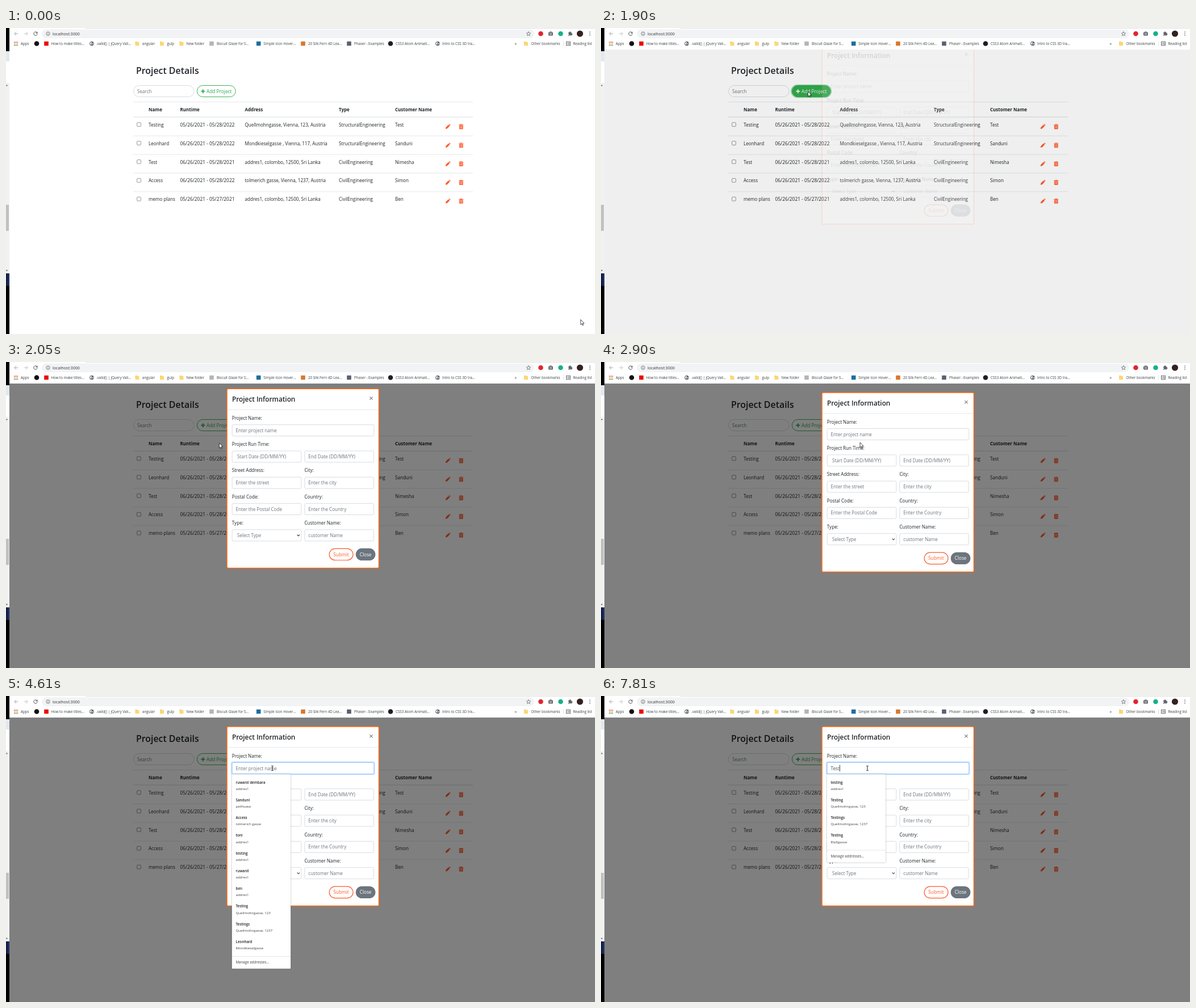
An HTML page for the animation above (8 s loop, 1037 by 540 pixels).

```html
<!DOCTYPE html>
<html lang="en">
<head>
<meta charset="utf-8">
<title>Project Details</title>
<style>
html, body { margin: 0; width: 100%; height: 100%; overflow: hidden; background: #fff; }
svg { display: block; width: 100vw; height: 100vh; font-family: "Open Sans", "Noto Sans", sans-serif; }
text { white-space: pre; }
.menu { filter: drop-shadow(0 .6px 1px rgba(0, 0, 0, .35)); }
</style>
</head>
<body>
<svg id="stage" viewBox="0 0 1037 540"></svg>
<script>
const DURATION = 8000;
const INK = '#212529', MUTED = '#6c757d', LINE = '#dee2e6', ORANGE = '#ff5a2b', GREEN = '#28a745';

// ---- drawing helpers
const text = (x, y, s, size = 8.1, fill = INK, more = '') =>
  `<text x="${x}" y="${y}" font-size="${size}" fill="${fill}" ${more}>${s}</text>`;
const rect = (x, y, w, h, fill, more = '') =>
  `<rect x="${x}" y="${y}" width="${w}" height="${h}" fill="${fill}" ${more}/>`;
const dot = (x, y, r, fill, more = '') => `<circle cx="${x}" cy="${y}" r="${r}" fill="${fill}" ${more}/>`;
const path = (d, fill = 'none', more = '') => `<path d="${d}" fill="${fill}" ${more}/>`;
const at = (x, y, body) => `<g transform="translate(${x} ${y})">${body}</g>`;
const group = (id, body, more = '') => `<g id="${id}" ${more}>${body}</g>`;
const stroke = (color, w = 1) => `stroke="${color}" stroke-width="${w}"`;
const bold = 'font-weight="700"', semi = 'font-weight="600"';

// ---- icons, centred on the origin
const folder = rect(-3.5, -3.6, 3.6, 2, '#f2c14e', 'rx=".5"') + rect(-3.5, -2.7, 7, 6.4, '#fbd775', 'rx=".6"');
const globe = dot(0, 0, 3.8, '#5f6368') +
  path('M-2.8-1.5L-.6-2.6.4-1.2-1 .2-.3 1.8-1.2 2.6-2.6.6ZM1.2-.6L2.9-.9 2.8.9 1.6 2Z', '#fff');
const square = color => rect(-3.8, -3.8, 7.6, 7.6, color, 'rx=".6"');
const disc = color => dot(0, 0, 4.3, color);
const pen = path('M-4.2 4.2L-3.6 1.3 1-3.2 3.2-1-1.3 3.6ZM1.6-3.8L2.4-4.4Q2.9-4.6 3.3-4.2L4.2-3.3Q4.6-2.9 4.4-2.4L3.8-1.6Z', ORANGE);
const trash = rect(-1.3, -4.4, 2.6, 1.2, ORANGE) + rect(-3.9, -3.7, 7.8, 1.2, ORANGE, 'rx=".3"') +
  path('M-3.4-2H3.4V3.4Q3.4 4.4 2.4 4.4H-2.4Q-3.4 4.4-3.4 3.4Z', ORANGE) +
  path('M-1.6-1V3.2M0-1V3.2M1.6-1V3.2', 'none', stroke('#fff', .55));
const star = path('M0-3.6L1.1-1.2 3.6-.9 1.7.8 2.3 3.4 0 2.1-2.3 3.4-1.7.8-3.6-.9-1.1-1.2Z', 'none', stroke('#5f6368', .8));
const camera = rect(-3.9, -2.6, 7.8, 6, '#5f6368', 'rx=".8"') + rect(-1.6, -3.7, 3.2, 1.6, '#5f6368') +
  dot(0, .4, 1.9, '#fff') + dot(0, .4, 1.2, '#5f6368');
const puzzle = rect(-3.4, -2.2, 5.8, 5.8, '#5f6368', 'rx=".7"') + dot(-.5, -2.5, 1.3, '#5f6368') +
  dot(2.7, .7, 1.3, '#5f6368') + dot(-3.2, .8, .9, '#fff') + dot(-.5, 3.4, .9, '#fff');
const arrow = 'M3.4 0H-3.2M0-3.3L-3.3 0 0 3.3';

// ---- browser frame
function leftStrip() {
  return rect(0, 0, 6, 540, '#000') + rect(0, 41, 6, 18, '#e4e8ee') + rect(0, 59, 6, 38, '#fff') +
    rect(0, 97, 6, 336, '#f1f1f1') + rect(0, 312, 5, 46, '#c1c1c1') +
    path('M0 102.2L1.4 100 2.9 102.2ZM0 427L1.4 429.2 2.9 427Z', '#505050') +
    rect(0, 433, 6, 22, '#14204a') + rect(4, 433, 1, 22, '#31456f');
}

function toolbar() {
  const grey = '#5f6368';
  return rect(6, 0, 1031, 38, '#fff') + rect(140, 0, 897, 1, '#dee1e6') +
    rect(63, 2.5, 867, 15.5, '#f1f3f4', 'rx="7.75"') +
    at(18, 10, path(arrow, 'none', stroke('#9a9da1', .9))) +
    at(35, 10, path(arrow, 'none', stroke('#b9bbbe', .9) + ' transform="scale(-1 1)"')) +
    at(52, 10, path('M2.6-1.9A3.2 3.2 0 1 0 3.2.5', 'none', stroke('#4a4d51', 1)) + path('M3.5-3.7V-.6H.4Z', '#4a4d51')) +
    at(74, 10, dot(0, 0, 3.2, 'none', stroke(grey, .8)) + path('M0-.4V1.8M0-1.9V-1.1', 'none', stroke(grey, .9))) +
    text(82, 12.6, 'localhost:3000', 7.1, '#303236') +
    at(920, 10, star) + at(941.5, 10, disc('#e0262d')) + at(959, 10, camera) +
    at(976.5, 10, disc('#15b08a')) + at(993.5, 10, puzzle) + at(1010.5, 10, dot(0, 0, 5.6, '#35211f')) +
    [-3, 0, 3].map(d => dot(1028, 10 + d, .85, grey)).join('');
}

function bookmarks() {
  const items = [
    [54, disc('#111')], [71, square('#f00000'), 79.5, 'How to make titles...'],
    [151, globe, 159, '.valid() | jQuery Vali...'], [231, folder, 240, 'angular'],
    [274.5, folder, 283.5, 'gulp'], [309, folder, 317.5, 'New folder'],
    [362, square('#b5b5b5'), 371, 'Biscuit Glaze for S...'], [444.7, square('#1c6f9c'), 453.3, 'Simple Icon Hover...'],
    [523, square('#d8772e'), 532, '20 Silk Fern 4D Lea...'], [604, square('#5b5f72'), 613, 'Phaser - Examples'],
    [677, disc('#1e1f26'), 686, 'CSS3 Atom Animati...'], [760, globe, 768, 'Intro to CSS 3D tra...'],
    [915.5, folder, 924.5, 'Other bookmarks']
  ];
  const hues = ['#e04a3f', '#e8a33b', '#4c9a52'];
  let out = text(26, 29.8, 'Apps', 6.2, '#3c4043') + text(895.5, 29.8, '»', 7.5, '#3c4043') +
    text(998.5, 29.8, 'Reading list', 6.2, '#3c4043');
  for (let i = 0; i < 9; i++) out += rect(14 + i % 3 * 2.7, 24.3 + Math.floor(i / 3) * 2.7, 1.7, 1.7, hues[Math.floor(i / 3)]);
  for (const [x, icon, tx, label] of items)
    out += at(x, 27.5, icon) + (label ? text(tx, 29.8, label, 6.2, '#3c4043') : '');
  return out + path('M981.5 23V32', 'none', stroke('#dadce0', .8)) +
    at(990, 27.5, rect(-3.5, -3.3, 7, 6.6, 'none', stroke('#5f6368', .9)) +
      path('M-2.2-1.5H-1M-2.2 0H-1M-2.2 1.5H-1M-.3-1.5H2.4M-.3 0H2.4M-.3 1.5H2.4', 'none', stroke('#5f6368', .8)));
}

// ---- page
const columns = [251, 306.5, 420.5, 586, 685];
const rows = [
  ['Testing', '05/26/2021 - 05/28/2022', 'Quellmohngasse, Vienna, 123, Austria', 'StructuralEngineering', 'Test'],
  ['Leonhard', '06/26/2021 - 05/28/2022', 'Mondkieselgasse , Vienna, 117, Austria', 'StructuralEngineering', 'Sanduni'],
  ['Test', '06/26/2021 - 05/28/2021', 'addres1, colombo, 12500, Sri Lanka', 'CivilEngineering', 'Nimesha'],
  ['Access', '06/26/2021 - 05/28/2022', 'tolmerich gasse, Vienna, 1237, Austria', 'CivilEngineering', 'Simon'],
  ['memo plans', '05/26/2021 - 05/27/2021', 'addres1, colombo, 12500, Sri Lanka', 'CivilEngineering', 'Ben']
];

function page() {
  let out = text(229, 80.6, 'Project Details', 15.9, INK, semi) +
    rect(224.5, 101.5, 106.5, 20, '#fff', 'rx="10" ' + stroke('#ced4da', .8)) +
    text(231, 115, 'Search', 8.1, MUTED) +
    rect(335.2, 100.6, 70, 21.8, 'none', 'id="ring" rx="10.9" ' + stroke('rgba(40,167,69,.5)', 1.8)) +
    rect(336.4, 101.5, 67.8, 20, GREEN, 'id="button" rx="10" ' + stroke(GREEN, .9)) +
    group('caption', path('M346.8 108.2V115.2M343.3 111.7H350.3', 'none', 'stroke="currentColor" stroke-width="1.7"') +
      text(353, 114.8, 'Add Project', 8.3, 'currentColor'));
  ['Name', 'Runtime', 'Address', 'Type', 'Customer Name'].forEach((s, i) => out += text(columns[i], 147, s, 8, INK, bold));
  out += rect(224, 130, 598, .8, LINE) + rect(224, 156.4, 598, 1.2, LINE);
  rows.forEach((row, r) => {
    const y = 171 + r * 32.85;
    row.forEach((s, i) => out += text(columns[i], y + 2.9, s, i === 1 ? 8.38 : 8.1));
    out += rect(230.6, y - 4.1, 6.8, 6.8, '#fff', 'rx="1.3" ' + stroke('#767676', .75));
    out += at(778, y + 3, pen) + at(801.3, y + 3, trash);
    if (r < 4) out += rect(224, y + 18.9, 598, .8, LINE);
  });
  return out;
}

// ---- dialog
const field = (x, y, w, label, hint, id = '', dx = 6.8) =>
  (label ? text(x, y - 8.4, label) : '') +
  rect(x + .4, y + .4, w, 20, '#fff', `${id && `id="${id}"`} rx="2" ` + stroke('#ced4da', .8)) +
  text(x + dx, y + 13.4, hint, 8.1, MUTED, id && `id="${id}Hint"`);

function dialog() {
  const L = 397.8, R = 525.5, W = 121.6;
  return rect(389, 54, 267.5, 316.6, '#fff', 'rx="2.2" ' + stroke('#ff6a13', 1.5)) +
    text(398, 77.2, 'Project Information', 11.8, INK, semi) +
    path('M640.4 68.2L645.6 73.4M645.6 68.2L640.4 73.4', 'none', stroke('#7a7a7a', 1.1)) +
    rect(390, 90.5, 266, .8, LINE) +
    rect(396.9, 116.4, 251.6, 22, 'none', 'id="glow" rx="2.8" ' + stroke('#bfdeff', 1.9)) +
    field(L, 117.1, 249.6, 'Project Name:', 'Enter project name', 'name') +
    text(404.6, 130.5, '', 8.1, '#495057', 'id="typed"') +
    rect(405, 121.5, .8, 11.5, '#222', 'id="caret"') +
    field(L, 163.4, W, 'Project Run Time:', 'Start Date (DD/MM/YY)', '', 9.2) +
    field(R, 163.4, W, '', 'End Date (DD/MM/YY)') +
    field(L, 209.7, W, 'Street Address:', 'Enter the street') + field(R, 209.7, W, 'City:', 'Enter the city') +
    field(L, 256, W, 'Postal Code:', 'Enter the Postal Code') + field(R, 256, W, 'Country:', 'Enter the Country') +
    field(L, 302.3, W, 'Type:', 'Select Type', '', 9.2) + field(R, 302.3, W, 'Customer Name:', 'customer Name') +
    path('M512.6 311.6L514.8 313.8 517 311.6', 'none', stroke('#343a40', 1.1)) +
    rect(569.2, 336.2, 41.8, 20.4, '#fff', 'rx="10.2" ' + stroke(ORANGE, 1.2)) +
    text(590, 349.4, 'Submit', 8.3, ORANGE, 'text-anchor="middle"') +
    rect(615.8, 335.7, 34.6, 21.4, MUTED, 'rx="10.7"') +
    text(633.1, 349.4, 'Close', 8.2, '#fff', 'text-anchor="middle"');
}

function menu(id, entries) {
  const end = 146.5 + entries.length * 31.25;
  let out = rect(397.8, 138, 103.4, end - 115.7, '#fff', 'class="menu" rx="1"');
  entries.forEach(([name, street], i) => {
    const y = 154.5 + i * 31.25;
    out += text(404.5, y, name, 6.3, '#202124', semi) + text(404.5, y + 11.3, street, 6.1, '#3c4043');
  });
  return group(id, out + rect(398, end + .2, 103, .7, '#dcdcdc') + text(404.5, end + 13.3, 'Manage addresses...', 6.2, '#3c4043'));
}

const matches = [['testing', 'addres1'], ['Testing', 'Quellmohngasse, 123'], ['Testings', 'Quellmohngasse, 1237']];
const people = [['ruwanil dembara', 'addres1'], ['Sanduni', 'pelthuwa'], ['Access', 'tolmerich gasse'], ['toni', 'addres1'],
  matches[0], ['ruwanil', 'addres1'], ['ben', 'addres1'], matches[1], matches[2], ['Leonhard', 'Mondkieselgasse']];

const pointer =
  group('arrow', path('M0 0V9L2.1 7.1 3.5 10.3 4.8 9.7 3.4 6.6H6.2Z', '#fff', stroke('#000', .7))) +
  group('hand', path('M-.7.6Q0-.3.8.6V4L3.9 4.8Q4.9 5.2 4.7 6.3L4.1 10H-.9L-3 6.7Q-2.9 5.6-1.8 6.1L-.7 7Z', '#fff', stroke('#000', .7))) +
  group('beam', path('M-1.8-4.2Q-.2-4.2 0-3.4 .2-4.2 1.8-4.2M0-3.4V3.4M-1.8 4.2Q-.2 4.2 0 3.4 .2 4.2 1.8 4.2', 'none', stroke('#000', .9)));

document.getElementById('stage').innerHTML =
  rect(0, 0, 1037, 540, '#fff') + page() + rect(6, 37.5, 1031, 502.5, '#000', 'id="shade"') +
  group('dialog', dialog()) + menu('all', people) + menu('few', [...matches, ['Testing', 'Blaßgasse']]) +
  toolbar() + bookmarks() + leftStrip() + group('pointer', pointer);

// ---- motion
const $ = id => document.getElementById(id);
const clamp = v => v < 0 ? 0 : v > 1 ? 1 : v;
const ramp = (t, start, length) => clamp((t - start) / length);
const set = (id, name, value) => $(id).setAttribute(name, value);
const show = (id, on) => set(id, 'visibility', on ? 'visible' : 'hidden');
const mix = (a, b, k) => `rgb(${a.map((v, i) => Math.round(v + (b[i] - v) * k))})`;
const span = (a, b, n) => Array.from({ length: n }, (_, i) => a + (b - a) * i / (n - 1));

// the screen refreshes only at these moments
const ticks = [0, 70, ...span(220, 950, 11), ...span(1030, 1500, 7), 1640, 1720, 1810, 1900, 1970, 2050, 2120, 2200,
  ...span(2580, 2900, 6), 3020, 3140, ...span(3460, 3890, 6), 4030, 4115, 4200];
const snap = t => t > 4200 ? t : ticks.reduce((best, v) => v <= t + .01 ? v : best, 0);

// time, x, y, ease-out power of the move that ends here
const moves = [[0, 1011.8, 514.6], [70, 934.6, 444.5, 1], [150, 934.6, 444.5, 1], [950, 539.5, 246.5, 1],
  [1500, 364.4, 112, 1.8], [1900, 364.4, 112, 1], [1970, 368.4, 125, 1], [2050, 375.5, 143, 1], [2510, 375.5, 143, 1],
  [2900, 456, 142, 1.2], [3140, 474.6, 140, 1.6], [3400, 474.6, 140, 1], [3890, 469, 127.5, 1.6]];

function pointerAt(t) {
  const i = moves.findIndex(m => m[0] > t);
  if (i < 0) return moves[moves.length - 1].slice(1, 3);
  const [t0, x0, y0] = moves[i - 1], [t1, x1, y1, power] = moves[i];
  const k = 1 - Math.pow(1 - (t - t0) / (t1 - t0), power);
  return [x0 + (x1 - x0) * k, y0 + (y1 - y0) * k];
}

// cubic-bezier(0, 0, .58, 1)
function easeOut(x) {
  let lo = 0, hi = 1;
  for (let i = 0; i < 20; i++) {
    const s = (lo + hi) / 2;
    if (1.74 * s * s * (1 - s) + s * s * s < x) lo = s; else hi = s;
  }
  return 3 * lo * lo - 2 * lo * lo * lo;
}

function draw(time) {
  const t = snap(time);

  const leave = 1 - ramp(t, 1893, 150);
  const hover = Math.min(ramp(t, 1340, 150), leave);
  set('button', 'fill-opacity', hover);
  set('caption', 'color', mix([40, 167, 69], [255, 255, 255], hover));
  set('ring', 'opacity', Math.min(ramp(t, 1620, 150), leave));

  const fade = ramp(t, 1882, 140);
  set('shade', 'opacity', fade * .5);
  set('dialog', 'opacity', fade);
  set('dialog', 'transform', `translate(0 ${-27 * (1 - easeOut(ramp(t, 1882, 300)))})`);

  const focus = ramp(t, 4030, 150);
  set('glow', 'opacity', focus);
  set('name', 'stroke', mix([206, 212, 218], [128, 189, 255], focus));

  const typed = 'Test'.slice(0, [6950, 7270, 7580, 7810].filter(v => v <= t).length);
  $('typed').textContent = typed;
  show('nameHint', !typed);
  set('caret', 'x', 405 + (typed ? $('typed').getComputedTextLength() : 0));
  const flips = [4030, 4610, 5140, 5690, 6180, 6720, 6950].filter(v => v <= t).length;
  show('caret', flips % 2 === 1);
  show('all', t >= 4115 && !typed);
  show('few', typed);

  const [x, y] = pointerAt(t);
  const beam = t > 3400 && y < 137.5, hand = t >= 1340 && t < 1882;
  set('pointer', 'transform', `translate(${x} ${y})`);
  show('beam', beam);
  show('hand', hand);
  show('arrow', !beam && !hand);
}

const start = performance.now();
function loop() {
  draw((performance.now() - start) % DURATION);
  requestAnimationFrame(loop);
}
draw(0);
loop();
</script>
</body>
</html>
```
